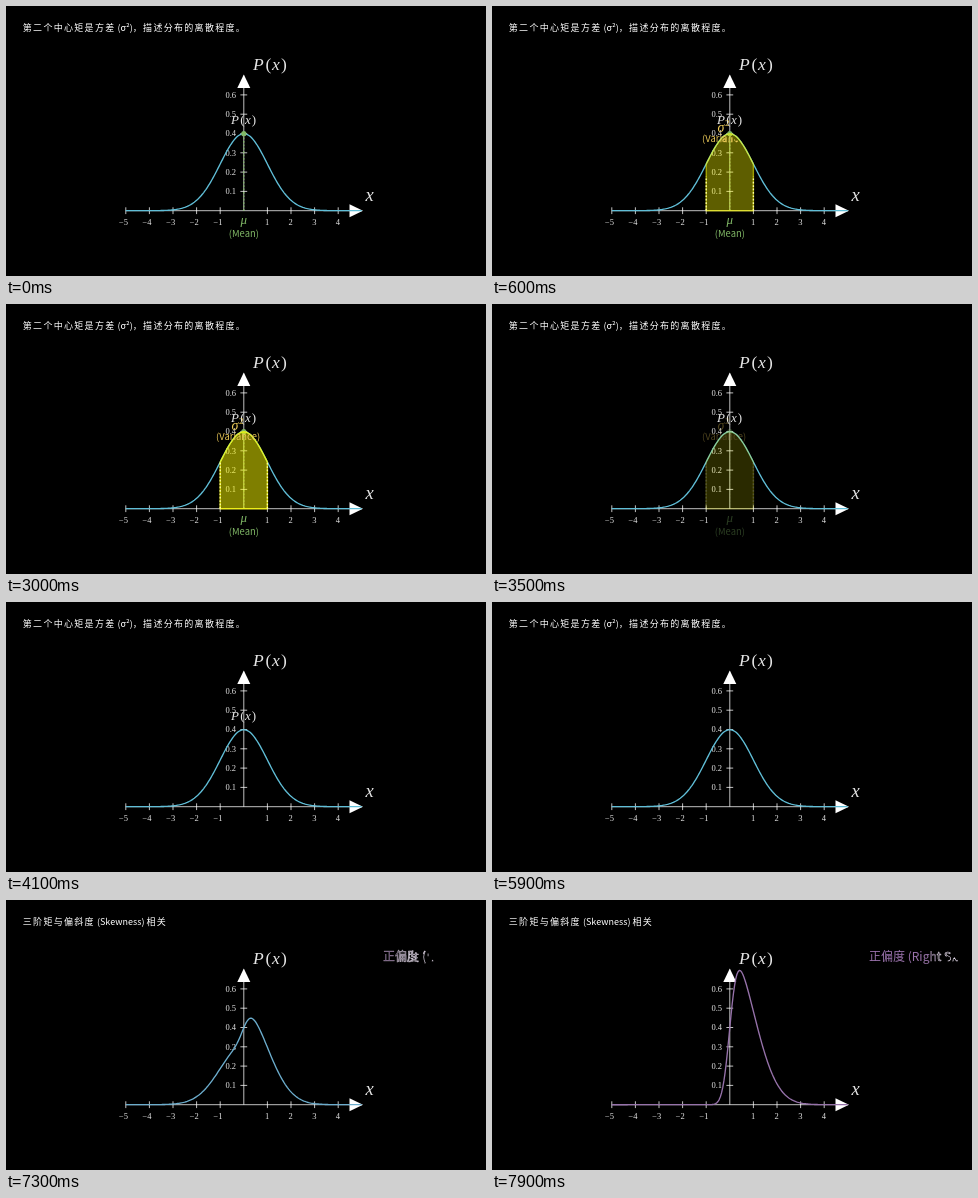
An HTML page with a canvas for the animation above (8000 ms loop, 480 by 270 pixels).

```html
<!DOCTYPE html>
<html lang="zh-CN">
<head>
<meta charset="utf-8">
<style>
html, body { margin: 0; width: 100%; height: 100%; overflow: hidden; background: #000; }
canvas { display: block; }
</style>
</head>
<body>
<canvas id="stage" width="480" height="270"></canvas>
<script>
const ctx = document.getElementById('stage').getContext('2d');
const LOOP = 8000, STEP = 100;
const SANS = '"Noto Sans CJK SC", "Noto Sans CJK", "Noto Sans", sans-serif';
const SERIF = '"Liberation Serif", serif';
const BLUE = [96, 190, 215], PURPLE = [150, 114, 170];
const GREEN = '#80b866', GOLD = '#ecca58', YELLOW = '#ffff00', PALE = '#ffffa0';
const WHITE = '#fff', SOFT = '#e4e4e4';
const X0 = 237.8, Y0 = 204.7, UNIT_X = 23.6, UNIT_Y = 193;
const OLD_TITLE = '第二个中心矩是方差 (σ²)，描述分布的离散程度。';
const NEW_TITLE = '三阶矩与偏斜度 (Skewness) 相关';

const px = x => X0 + x * UNIT_X;
const py = y => Y0 - y * UNIT_Y;
const lerp = (a, b, s) => a + (b - a) * s;
const clamp = v => Math.max(0, Math.min(1, v));
const mix = (a, b, s) => `rgb(${a.map((v, i) => Math.round(lerp(v, b[i], s)))})`;
const sigmoid = v => 1 / (1 + Math.exp(-v));
const progress = (t, start, length = 1000) => clamp((t - start) / length);
const smooth = a => {
  const edge = sigmoid(-5);
  return clamp((sigmoid(10 * (a - 0.5)) - edge) / (1 - 2 * edge));
};

const normal = x => Math.exp(-x * x / 2) / Math.sqrt(2 * Math.PI);
// Logistic-style approximation of the normal distribution function
const cumulative = x => sigmoid(1.5976 * x + 0.07057 * x ** 3);
const skewed = x => 2 * normal(x) * cumulative(4 * x);

function line(x1, y1, x2, y2, color, width, dash = []) {
  ctx.strokeStyle = color;
  ctx.lineWidth = width;
  ctx.setLineDash(dash);
  ctx.beginPath();
  ctx.moveTo(x1, y1);
  ctx.lineTo(x2, y2);
  ctx.stroke();
  ctx.setLineDash([]);
}

function polygon(color, ...points) {
  ctx.fillStyle = color;
  ctx.beginPath();
  points.forEach(p => ctx.lineTo(...p));
  ctx.fill();
}

function text(str, x, y, font, color = WHITE, align = 'left') {
  ctx.font = font;
  ctx.fillStyle = color;
  ctx.textAlign = align;
  ctx.fillText(str, x, y);
}

function faded(alpha, draw) {
  if (alpha <= 0) return;
  ctx.save();
  ctx.globalAlpha = alpha;
  draw();
  ctx.restore();
}

// Lays out single characters; tracking widens the Chinese ones only.
function glyphs(str, x, y, size, { font = `${size}px ${SANS}`, tracking = 0 } = {}) {
  ctx.font = font;
  return [...str].map(char => {
    const glyph = { char, x, y, size, font };
    x += ctx.measureText(char).width + (char > '\u2e80' ? tracking : 0);
    return glyph;
  }).filter(g => g.char !== ' ');
}

// Each glyph traces its outline, then fills, overlapping with its neighbours.
function write(list, a, color, outline) {
  const total = 1 + 0.2 * (list.length - 1);
  list.forEach((g, i) => {
    const p = clamp(a * total - 0.2 * i), fill = clamp(2 * p - 1);
    if (!p) return;
    faded(fill, () => text(g.char, g.x, g.y, g.font, color));
    if (fill < 1) faded(1 - fill * 0.7, () => {
      const length = g.size * 3;
      ctx.font = g.font;
      ctx.textAlign = 'left';
      ctx.strokeStyle = outline;
      ctx.lineWidth = lerp(0.67, 0.1, fill);
      if (p < 0.5) ctx.setLineDash([2 * p * length, length]);
      ctx.strokeText(g.char, g.x, g.y);
    });
  });
}

function functionLabel(x, y, size) {
  const roman = `${size}px ${SERIF}`, italic = `italic ${size}px ${SERIF}`;
  text('P', x, y, italic, SOFT);
  text('(', x + size * 0.72, y, roman, SOFT);
  text('x', x + size * 1.08, y, italic, SOFT);
  text(')', x + size * 1.6, y, roman, SOFT);
}

function axes() {
  const small = `8.5px ${SERIF}`;
  line(px(-5), Y0, px(5), Y0, WHITE, 0.75);
  line(X0, Y0, X0, py(0.7), WHITE, 0.75);
  polygon(WHITE, [357, Y0], [343.5, Y0 - 6.5], [343.5, Y0 + 6.5]);
  polygon(WHITE, [X0, 68.5], [X0 - 6.5, 82], [X0 + 6.5, 82]);
  for (let n = -5; n <= 4; n++) {
    if (!n) continue;
    line(px(n), Y0 - 3.4, px(n), Y0 + 3.4, WHITE, 0.75);
    text(n < 0 ? '−' + -n : n, px(n) - (n < 0 ? 2.3 : 0.3), 219, small, SOFT, 'center');
  }
  for (let n = 1; n <= 6; n++) {
    const y = py(n / 10);
    line(X0 - 3.4, y, X0 + 3.4, y, WHITE, 0.75);
    text('0.' + n, 230, y + 2.7, small, SOFT, 'right');
  }
  functionLabel(247, 64, 17.5);
  text('x', 359.5, 195.2, `italic 18.5px ${SERIF}`, SOFT);
}

function tracePath(from, to, f) {
  for (let x = from; x <= to + 1e-6; x += 0.05) ctx.lineTo(px(x), py(f(x)));
}

function curve(s) {
  ctx.strokeStyle = mix(BLUE, PURPLE, s);
  ctx.lineWidth = 1.35;
  ctx.lineJoin = 'round';
  ctx.beginPath();
  tracePath(-5, 5, x => lerp(normal(x), skewed(x), s));
  ctx.stroke();
}

function mean() {
  const top = py(normal(0));
  line(X0, Y0, X0, top, GREEN, 1.2, [1.7, 1.7]);
  ctx.fillStyle = GREEN;
  ctx.beginPath();
  ctx.arc(X0, top, 2.6, 0, 7);
  ctx.fill();
  text('μ', X0, 217.6, `italic 13px ${SERIF}`, GREEN, 'center');
  text('(Mean)', X0, 230.5, `9.4px ${SANS}`, GREEN, 'center');
}

function variance(a) {
  const s = smooth(a);
  ctx.beginPath();
  ctx.moveTo(px(-1), Y0);
  tracePath(-1, 1, normal);
  ctx.lineTo(px(1), Y0);
  ctx.closePath();
  ctx.fillStyle = ctx.strokeStyle = YELLOW;
  ctx.lineWidth = 1.35;
  faded(0.5 * s, () => ctx.fill());
  faded(0.75 * s, () => ctx.stroke());
  if (s > 0) for (const x of [-1, 1])
    line(px(x), Y0, px(x), py(normal(x) * s), PALE, 1.35, [1.7, 1.7]);
  write([
    ...glyphs('σ', 225.5, 126.4, 14, { font: `italic 14px ${SERIF}` }),
    ...glyphs('2', 233, 120, 9, { font: `9px ${SERIF}` }),
    ...glyphs('(Variance)', 210, 135.5, 9.4)
  ], a, GOLD, GOLD);
}

function title(s) {
  const style = { tracking: 1.3 };
  const from = glyphs(OLD_TITLE, 16.8, 25.2, 9, style);
  const to = glyphs(NEW_TITLE, 16.8, 25.2, 9, style);
  const match = i => Math.floor(i * to.length / from.length);
  from.forEach((g, i) => {
    const target = to[match(i)], spare = i > 0 && match(i) === match(i - 1);
    const x = lerp(g.x, target.x, s);
    faded(spare ? 1 - s : Math.min(1, 2 - 2 * s), () => text(g.char, x, g.y, g.font));
    if (!spare) faded(Math.min(1, 2 * s), () => text(target.char, x, g.y, g.font));
  });
}

// Fades a group as a whole by blending in what lies beneath it.
function blendBack(below, amount) {
  const now = ctx.getImageData(0, 0, 480, 270);
  now.data.forEach((v, i) => { now.data[i] = lerp(v, below.data[i], amount); });
  ctx.putImageData(now, 0, 0);
}

function draw(t) {
  ctx.fillStyle = '#000';
  ctx.fillRect(0, 0, 480, 270);
  axes();
  curve(smooth(progress(t, 6920)));
  faded(1 - smooth(progress(t, 4430)), () => functionLabel(225, 118, 13));

  const visible = 1 - smooth(progress(t, 2930));
  if (visible > 0) {
    const below = ctx.getImageData(0, 0, 480, 270);
    mean();
    variance(progress(t, 0));
    if (visible < 1) blendBack(below, 1 - visible);
  }

  title(smooth(progress(t, 5920)));
  write(glyphs('正偏度 (Right Skewness)', 377, 61, 12), progress(t, 6920, 2000), '#9a72ac', '#e6dcec');
}

function frame(now) {
  draw(Math.floor(now % LOOP / STEP) * STEP);
  requestAnimationFrame(frame);
}
requestAnimationFrame(frame);
</script>
</body>
</html>
```
